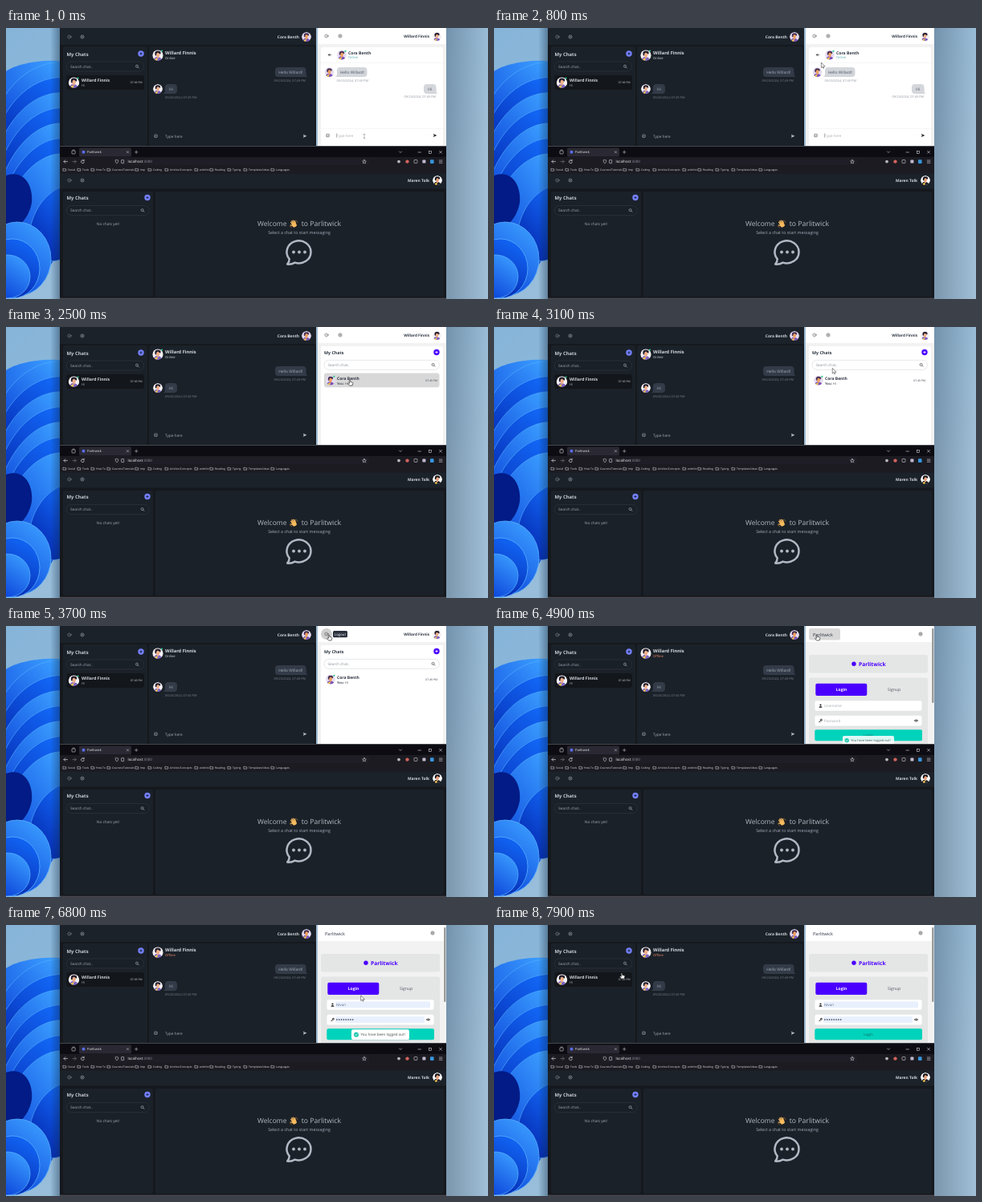
These frames come from a looping animation (600 by 338 pixels, 8000 ms). An HTML page:

```html
<!DOCTYPE html>
<html lang="en">
<head>
<meta charset="utf-8">
<title>Chat demo</title>
<style>
  html, body { margin: 0; width: 100%; height: 100%; overflow: hidden; background: #98bbd6; }
  svg { display: block; width: 100vw; height: 100vh; }
  text { font-family: "Open Sans", "Noto Sans", sans-serif; text-rendering: geometricPrecision; white-space: pre; }
</style>
</head>
<body>
<svg id="stage" viewBox="0 0 600 338"></svg>
<script>
const LOOP = 8000, STEP = 100;
const JADE = 'Cora Benth', ELL = 'Willard Finnis', RYL = 'Maren Tolk', BRAND = 'Parlitwick';
const GREET = 'Hello Willard!', STAMP = '09/23/2024, 07:49 PM';

// Drawing helpers
const rect = (x, y, w, h, fill, r = 0, more = '') =>
  `<rect x="${x}" y="${y}" width="${w}" height="${h}" rx="${r}" fill="${fill}" ${more}/>`;
const dot = (x, y, r, fill, more = '') => `<circle cx="${x}" cy="${y}" r="${r}" fill="${fill}" ${more}/>`;
const text = (x, y, size, str, fill, bold = 0, anchor = 'start') =>
  `<text x="${x}" y="${y}" font-size="${size}" fill="${fill}" font-weight="${bold ? 700 : 400}" text-anchor="${anchor}">${str}</text>`;
const line = (d, color, w = .7, fill = 'none') =>
  `<path d="${d}" fill="${fill}" stroke="${color}" stroke-width="${w}" stroke-linecap="round" stroke-linejoin="round"/>`;
const fillPath = (d, fill) => `<path d="${d}" fill="${fill}"/>`;
const at = (x, y, body, s = 1) => `<g transform="translate(${x} ${y}) scale(${s})">${body}</g>`;
const group = (id, body) => `<g id="${id}">${body}</g>`;

// Icons, centred on their own origin
const logout = c => line('M1 -1.6A2 2 0 1 0 1 1.6M-.2 0H2.4M1.6 -.8L2.4 0L1.6 .8', c, .55);
const sun = c => dot(0, 0, 1.2, 'none', `stroke="${c}" stroke-width=".6"`) +
  [0, 45, 90, 135, 180, 225, 270, 315].map(a => `<g transform="rotate(${a})">${line('M0 -2V-2.4', c, .6)}</g>`).join('');
const search = c => dot(-.4, -.4, 1.5, 'none', `stroke="${c}" stroke-width=".7"`) + line('M.8 .8L2 2', c);
const send = c => fillPath('M-2.2 -2L2.4 0L-2.2 2L-1.4 .3L.6 0L-1.4 -.3Z', c);
const picture = c => rect(-1.7, -1.7, 3.4, 3.4, 'none', .4, `stroke="${c}" stroke-width=".6"`) +
  line('M-1.4 1L-.3 -.3L.5 .6L1.4 -.2', c, .5);
const plus = (x, y, fill, ink) => dot(x, y, 3.7, fill) + at(x, y, line('M-1.3 0H1.3M0 -1.3V1.3', ink, .8));
const folder = (x, y) => at(x, y, line('M-1.7 -1.4H-.4L.1 -.9H1.8V1.5H-1.7Z', '#d8d8dc', .55));
const user = c => dot(0, -1, 1.1, c) + fillPath('M-2.1 2.2Q-2 .4 0 .4T2.1 2.2Z', c);
const key = c => dot(.9, -.8, 1, 'none', `stroke="${c}" stroke-width=".9"`) + line('M.1 0L-1.8 1.9M-1.1 1.2L-.5 1.8', c, .8);
const eye = c => line('M-2.3 0Q0 -2.8 2.3 0Q0 2.8 -2.3 0Z', c, .6) + dot(0, 0, .8, c);

const FACES = {
  jade: ['#e4dcf2', '#f0a060', '#4b3354', '#7a50b8'],
  ell: ['#f4f0f4', '#efb08a', '#241d2c', '#7b62c4'],
  ryl: ['#ffffff', '#e9a07c', '#17171c', '#22232b']
};
function avatar(who, x, y, r) {
  const [bg, skin, hair, shirt] = FACES[who];
  return at(x, y, `<g clip-path="url(#disc)">${dot(0, 0, 10, bg)}
    ${fillPath('M-8 11Q-7 2 0 3T8 11Z', shirt)}${fillPath('M-7 11Q-4 3 0 6L-2 11Z', '#f3c84b')}
    ${rect(-1.7, 0, 3.4, 5, skin, 1)}<ellipse cy="-1.5" rx="3.6" ry="4.3" fill="${skin}"/>
    ${fillPath('M-5 0Q-7 -8 0 -8T5 -2Q2 -3 0 -5Q-3 -4 -3.2 1Z', hair)}</g>`, r / 10);
}

// Ribbons fan out from the upper right and fold down to the left
function wallpaper() {
  const edge = '#58b0ff';
  const ribbon = i => {
    const y = 43 + i * 19, drop = 46 + i * 5;
    return line(`M74 ${y}C48 ${y - 3} 16 ${y + drop * .25} -4 ${y + drop}V${y + drop + 70}L74 ${y + 70}Z`,
      edge, .6, `url(#${i % 2 ? 'pb' : 'pa'})`);
  };
  const blob = (x, y, rx, ry, g) =>
    `<ellipse cx="${x}" cy="${y}" rx="${rx}" ry="${ry}" fill="url(#${g})" stroke="${edge}" stroke-width=".8"/>`;
  return rect(0, 0, 600, 338, 'url(#sky)') +
    fillPath('M0 54C14 44 50 38 72 42V270L40 320H0Z', 'url(#pa)') +
    [0, 1, 2, 3, 4, 5, 6].map(ribbon).join('') +
    fillPath('M0 184C22 176 34 196 32 218C28 240 12 252 0 254Z', '#031b86') +
    line('M74 196C50 204 32 226 28 262C40 290 56 296 74 286Z', edge, .6, 'url(#pb)') +
    blob(14, 288, 42, 46, 'pa') + blob(8, 300, 34, 37, 'pb') + blob(2, 310, 28, 27, 'pa') +
    rect(55, 0, 12, 338, 'url(#shadeL)') + rect(548, 0, 52, 338, 'url(#shadeR)');
}

function darkNav(y, name, who, nx, ax) {
  return at(79, y, logout('#8f98a5')) + at(95, y, sun('#a6adbb')) +
    text(nx, y + 2, 4.9, name, '#d3d8df', 1, 'end') + avatar(who, ax, y, 6);
}
function darkList(y, w, px) {
  return text(75.5, y + 2.7, 5.9, 'My Chats', '#c9ced6', 1) + plus(px, y, '#7582ff', '#141833') +
    rect(75.3, y + 10, w, 12, '#1a2027', 6, 'stroke="#303841" stroke-width=".6"') +
    text(80, y + 17.7, 4.7, 'Search chat..', '#a6adbb') + at(75 + w - 8, y + 16, search('#a6adbb'));
}
// side: 1 puts the tail at the lower right, -1 at the lower left
function bubble(x, y, w, side, str, fill, ink) {
  const corner = side > 0 ? x + w : x;
  return rect(x, y, w, 12, fill, 4) +
    fillPath(`M${corner} ${y + 6}V${y + 10}L${corner + side * 2} ${y + 12}H${corner - side * 5}Z`, fill) +
    text(x + w / 2, y + 7.8, 4.9, str, ink, 0, 'middle');
}

function leftWindow() {
  return rect(67, 0, 319, 147, '#15191e') + rect(67, 0, 319, 21, '#1c2229') +
    rect(71, 23, 105, 124, '#1b2128', 2) + rect(178, 23, 206, 124, '#1b2128', 2) +
    darkNav(11, JADE, 'jade', 365, 374) + darkList(32, 96.4, 168) +
    rect(75.5, 59, 96.5, 18, '#13161a', 3) + avatar('ell', 84.5, 68, 6.8) +
    text(94, 67, 5.2, ELL, '#d5dae1', 1) + text(94, 73.4, 4.3, 'Hi', '#9aa2ae') +
    text(169.5, 69.4, 3.4, '07:49 PM', '#d5d9de', 0, 'end') +
    avatar('ell', 189, 34, 6.8) + text(198, 33.2, 5.7, ELL, '#d5dae1', 1) +
    group('on', text(198, 39.4, 4.1, 'Online', '#d3d8df') + dot(89.5, 62.5, 1.1, '#26c98c') + dot(194, 28.5, 1.1, '#26c98c')) +
    group('off', text(198, 39.4, 4.1, 'Offline', '#f08a68')) +
    bubble(335, 49, 38.5, 1, GREET, '#333b48', '#a6adbb') +
    text(373, 66.6, 3.9, STAMP, '#7a838f', 0, 'end') +
    avatar('ell', 189, 76, 6) + bubble(198, 70, 15, -1, 'Hi', '#333b48', '#a6adbb') +
    text(198, 87.7, 3.9, STAMP, '#7a838f') +
    at(186.5, 134.7, picture('#a6adbb')) + text(198, 136.7, 4.7, 'Type here', '#a6adbb') + at(372, 134.7, send('#d0d5dd'));
}

function chatView() {
  return rect(392, 24, 152, 123, '#fff', 2) + rect(392, 43, 152, .6, '#f0f0f0') + rect(392, 125, 152, .6, '#f0f0f0') +
    line('M404.5 33.5H401.3M402.6 32.2L401.3 33.5L402.6 34.8', '#222', .7) +
    avatar('jade', 418, 33.5, 6) + dot(422.5, 28.8, 1.1, '#26c98c') +
    text(426, 32.6, 5.1, JADE, '#2b3340', 1) + text(426, 38.4, 4, 'Online', '#55aeb4') +
    avatar('jade', 402.5, 55, 6) + bubble(412, 49, 37.5, -1, GREET, '#d3d6db', '#4b5462') +
    text(411.5, 66.6, 3.9, STAMP, '#8c929b') +
    bubble(520, 70, 15.5, 1, 'Hi', '#d3d6db', '#4b5462') + text(535, 87.4, 3.9, STAMP, '#8c929b', 0, 'end') +
    at(400.5, 134, picture('#555')) + text(411.5, 135.8, 4.5, 'Type here', '#a9adb3') +
    rect(411, 131.5, .4, 5.2, '#555') + at(534, 134, send('#151515'));
}
function listView() {
  return rect(392, 24, 152, 123, '#fff', 2) + text(396, 33.6, 5.3, 'My Chats', '#2b3340', 1) +
    plus(536, 31.5, '#4a00ff', '#fff') +
    rect(396, 41.3, 143.5, 12, '#fff', 6, 'stroke="#d5d7da" stroke-width=".6"') +
    text(400.5, 49, 4.6, 'Search chat..', '#8a9099') + at(532, 47.3, search('#444')) +
    group('row', rect(396, 57.5, 143.5, 17.7, '#d8d8d8', 3)) +
    avatar('jade', 404, 66.5, 6) + dot(408.4, 61.8, 1.1, '#26c98c') +
    text(412, 65.6, 5, JADE, '#2b3340', 1) + text(412, 71.8, 4.1, '<tspan font-weight="700">You:</tspan> Hi', '#4d5560') +
    text(537, 67.8, 3.4, '07:49 PM', '#3a414c', 0, 'end');
}
function userNav() {
  return group('hot', dot(399, 10, 7, '#cfcfcf') + rect(407, 6, 18, 8.3, '#2a303c', 1.5) +
      text(416, 11.7, 4.3, 'Logout', '#fff', 0, 'middle')) +
    at(399, 10, logout('#444')) + group('theme', at(416, 10, sun('#444'))) +
    text(527, 12, 4.7, ELL, '#2b3340', 1, 'end') + avatar('ell', 536.5, 10.5, 5.6);
}
function loginView() {
  const field = y => rect(399.5, y, 133, 12.6, '#fff', 2);
  return rect(388, 20, 160, 128, '#f2f2f2') + group('brandHot', rect(392, 3, 39, 14.5, '#d8d8d8', 2.5)) +
    text(397, 12.7, 5.6, BRAND, '#2b3340') + at(531, 10, sun('#333')) +
    rect(392, 36, 148, 22.5, '#e4e5e5', 2) + rect(392, 64.5, 148, 84, '#e4e5e5', 2) +
    dot(448, 47.2, 2.7, '#4a00ff') + text(454, 50, 6.7, BRAND, '#4a00ff', 1) +
    rect(400.3, 71.7, 64, 15.2, '#4a00ff', 2) + text(432.5, 81.2, 5, 'Login', '#fff', 1, 'middle') +
    text(498, 81.2, 5, 'Signup', '#4d5560', 0, 'middle') +
    field(93.2) + field(111.8) + at(406.5, 99.5, user('#222')) + at(406.5, 118, key('#222')) +
    group('empty', text(411, 101.2, 4.5, 'Username', '#a4a8ae') + text(411, 119.8, 4.5, 'Password', '#a4a8ae')) +
    group('filled', rect(410, 95.5, 118, 7.8, '#e8f0fe') + rect(410, 114.2, 111, 7.8, '#e8f0fe') +
      text(411, 101, 4.5, 'tovun', '#566070') +
      [0, 1, 2, 3, 4, 5, 6, 7].map(i => dot(412 + i * 2.8, 118, .85, '#333a45')).join('')) +
    at(525.7, 118, eye('#222')) +
    rect(399.3, 129.3, 133.7, 14, '#00d3bb', 2) + text(466, 138.2, 4.5, 'Login', '#16635e', 0, 'middle') +
    rect(545, 0, 3, 148, '#f4f4f4') + rect(545.3, 3, 2, 93, '#8c8c8c', 1) +
    group('toast', rect(-36, -6.5, 72, 13, '#00000022', 2.4, 'transform="translate(0 .6)"') +
      rect(-36, -6.5, 72, 13, '#fff', 2.2) + dot(-30, 0, 3, '#16c7aa') + line('M-31.4 0L-30.3 1.1L-28.5 -1.1', '#fff', .8) +
      text(-24.5, 1.7, 4.5, 'You have been logged out!', '#4a4a4a'));
}

function browser() {
  const marks = [['Social', 77], ['Tools', 95], ['How To', 112], ['Courses/Tutorials', 132], ['Imp', 167], ['Coding', 183],
    ['Articles/Concepts', 204], ['wishlist', 241], ['Reading', 260], ['Typing', 282], ['Templates/Ideas', 302], ['Languages', 336]];
  const c = '#d8d8dc';
  return rect(67, 148, 481, 190, '#15191e') + rect(67, 148, 481, 13, '#0d0c12') + rect(67, 161, 481, 20.5, '#1c1b22') +
    rect(91, 149.5, 65, 11, '#2a2933', 1.5) + rect(82, 153, 4.2, 4, 'none', .8, `stroke="${c}" stroke-width=".6"`) + line('M83 152.2H85.2', c, .5) +
    dot(96.5, 154.8, 2, '#5b6cf0') + text(101, 156.3, 4, BRAND, '#eee') +
    line('M150.3 153.6L152.7 156M152.7 153.6L150.3 156M160.5 154.8H164M162.2 153V156.6', c, .5) +
    line('M489.5 154L491 155.5L492.5 154M513 155H516.5M539.5 153.3L542.5 156.3M542.5 153.3L539.5 156.3', c, .6) +
    rect(526.5, 153.3, 3, 3, 'none', 0, `stroke="${c}" stroke-width=".6"`) +
    line('M76.5 166.6H72M73.8 164.8L72 166.6L73.8 168.4', c, .7) + line('M83 166.6H87.2M85.5 164.8L87.2 166.6L85.5 168.4', '#77767f', .7) +
    line('M96.8 165.2A2 2 0 1 0 97.4 167.2M97.2 164.2V165.7H95.7', c, .7) +
    rect(134, 162.2, 318, 8.8, '#1f1e26', 1.8) + line('M138 164.5L139.8 165.2Q139.8 168 138 169Q136.2 168 136.2 165.2Z', c, .55) +
    rect(143.7, 164.6, 3, 4, 'none', .4, `stroke="${c}" stroke-width=".6"`) +
    text(151.5, 168.3, 4.5, 'localhost<tspan fill="#92919b">:3000</tspan>', '#fff') +
    line('M446 164.3L446.7 166L448.4 166.1L447.1 167.2L447.5 168.9L446 168L444.5 168.9L444.9 167.2L443.6 166.1L445.3 166Z', c, .55) +
    dot(489, 166.6, 1.9, '#b9b8c2') + dot(499.5, 166.6, 2.2, '#d5635d') +
    rect(508, 164.5, 4, 4, 'none', .8, `stroke="${c}" stroke-width=".6"`) +
    rect(518.4, 164.6, 4, 4, '#c3b9cf', .6) + rect(528, 164.3, 4.6, 4.6, '#3795dc', .6) +
    line('M539.3 165H543M539.3 166.7H543M539.3 168.4H543', c, .55) +
    marks.map(([s, x]) => folder(x - 4, 176.7) + text(x, 178.1, 3.4, s, '#e6e6ea')).join('') +
    rect(67, 181.5, 481, 19, '#1c2229') + rect(71, 204, 112, 131, '#1b2128', 2) + rect(186, 204, 359, 131, '#1b2128', 2) +
    darkNav(190, RYL, 'ryl', 527, 537) + darkList(211.5, 103, 176) +
    text(127, 245.6, 4.7, 'No chats yet!', '#a6adbb', 0, 'middle') +
    text(313, 247, 8.5, 'Welcome', '#b4bac5') + text(417, 247, 8.7, 'to ' + BRAND, '#b4bac5', 0, 'end') +
    at(358.2, 244.3, `<g transform="rotate(-28)">${line('M-1.8 -.5L-2.1 -3.4M-.5 -1L-.4 -4.3M1 -1L1.3 -4M2.2 0L2.8 -2.6M-2 1.5L-4 -.3', '#f6b95d', 1.35)}
      ${rect(-2.7, -1.2, 5.5, 5.4, '#f6b95d', 2)}</g>${line('M2.8 -4.4Q4.6 -3.6 4.8 -1.8M-4.8 2Q-4.3 4 -2.8 4.6', '#d28b3c', .5)}`) +
    text(365, 257.2, 5.3, 'Select a chat to start messaging', '#a6adbb', 0, 'middle') +
    line('M352.7 288A15 14 0 1 1 359.6 292.6Q355.5 295 350.2 294.6Q352.8 291.6 352.7 288Z', '#b2b9c4', 2.5) +
    [358, 365, 372].map(x => dot(x, 279.5, 1.9, '#b2b9c4')).join('') + rect(67, 336.7, 481, 1.3, '#4a474e');
}

const cursors = {
  arrow: line('M0 0V6.2L1.5 4.9L2.5 7L3.4 6.6L2.5 4.5H4.4Z', '#222', .5, '#fff'),
  hand: line('M-.7 .4Q0 -.5 .7 .4V2.5L3.4 3.1Q4 3.4 3.8 4.4L3.1 7H-.5L-2.4 4.5Q-2.4 3.3 -.7 4.2Z', '#111', .6, '#fff'),
  beam: line('M-1 -2.4H1M0 -2.4V2.4M-1 2.4H1', '#777', .5)
};
const grad = (id, a, b, dir) => `<linearGradient id="${id}" ${dir}><stop stop-color="${a}"/><stop offset="1" stop-color="${b}"/></linearGradient>`;

document.getElementById('stage').innerHTML = `<defs>
  <clipPath id="disc"><circle r="10"/></clipPath><clipPath id="pane"><rect x="388" width="160" height="147"/></clipPath>
  ${grad('sky', '#86b4d8', '#a6c5dc', 'x2=".9" y2=".6"')}
  ${grad('shadeL', '#0a203800', '#0a203860', '')}${grad('shadeR', '#0a203848', '#0a203808', '')}
  ${grad('pa', '#3a9cff', '#0436d4', 'x1=".8" x2=".1" y2="1"')}${grad('pb', '#1266f5', '#0322a8', 'x1=".7" x2=".2" y2="1"')}</defs>` +
  wallpaper() + leftWindow() + rect(386, 0, 2, 148, '#9db9d0') +
  `<g clip-path="url(#pane)">${rect(388, 0, 160, 148, '#f2f2f2')}${rect(388, 0, 160, 20, '#fff')}` +
  group('userNav', userNav()) + group('chat', chatView()) + group('list', listView()) + group('login', loginView()) + '</g>' +
  browser() + rect(67, 147, 481, 1, '#43474d') +
  group('cursor', Object.entries(cursors).map(([k, v]) => group(k, v)).join(''));

// Timeline
const path = [[0, 446, 135], [400, 445, 133], [900, 403, 33], [1100, 403, 33], [1600, 421, 55], [2100, 426, 65],
  [2500, 428, 66], [2900, 428, 66], [3500, 402, 11], [5000, 402, 11], [5700, 464, 86], [6300, 463, 92],
  [6900, 440, 88], [7500, 190, 70], [7900, 159, 60], [8000, 159, 60]];
const shapes = [[0, 'beam'], [700, 'arrow'], [900, 'hand'], [1200, 'arrow'], [1800, 'hand'], [3000, 'arrow'],
  [3400, 'hand'], [5100, 'arrow'], [7700, 'hand']];
const OPEN_LIST = 1100, LOG_OUT = 4600, FILL = 5100, TOAST_IN = 4820, TOAST_OUT = 6820;

const el = id => document.getElementById(id);
const show = (id, on) => { el(id).style.display = on ? '' : 'none'; };
const clamp = v => Math.max(0, Math.min(1, v));

function placeCursor(t) {
  const i = path.findIndex(p => p[0] > t), [t0, x0, y0] = path[i - 1], [t1, x1, y1] = path[i];
  const u = (t - t0) / (t1 - t0), e = u * u * (3 - 2 * u);
  el('cursor').setAttribute('transform', `translate(${x0 + (x1 - x0) * e} ${y0 + (y1 - y0) * e})`);
  const kind = shapes.filter(s => s[0] <= t).pop()[1];
  Object.keys(cursors).forEach(k => show(k, k === kind));
}
function placeToast(t) {
  const enter = 1 - (1 - clamp((t - TOAST_IN) / 350)) ** 5, leave = clamp((t - TOAST_OUT) / 400) ** 2;
  const hidden = Math.max(1 - enter, leave);
  show('toast', t >= TOAST_IN && leave < 1);
  el('toast').setAttribute('transform', `translate(466 ${136.7 + 22 * hidden}) scale(${1 - .4 * hidden})`);
  el('toast').setAttribute('opacity', leave ? 1 - leave : .5 + .5 * enter);
}
function render(t) {
  const out = t >= LOG_OUT;
  show('chat', t < OPEN_LIST);
  show('list', t >= OPEN_LIST && !out);
  show('userNav', !out);
  show('login', out);
  show('row', t >= 1500 && t < 3100);
  show('hot', t >= 3400);
  show('theme', t < 3400);
  show('brandHot', t < 5200);
  show('empty', t < FILL);
  show('filled', t >= FILL);
  show('on', t < LOG_OUT + 100);
  show('off', t >= LOG_OUT + 100);
  placeToast(t);
  placeCursor(t);
}
const start = performance.now();
function tick() {
  const t = (performance.now() - start) % LOOP;
  render(Math.floor(t / STEP) * STEP);
  requestAnimationFrame(tick);
}
tick();
</script>
</body>
</html>
```
